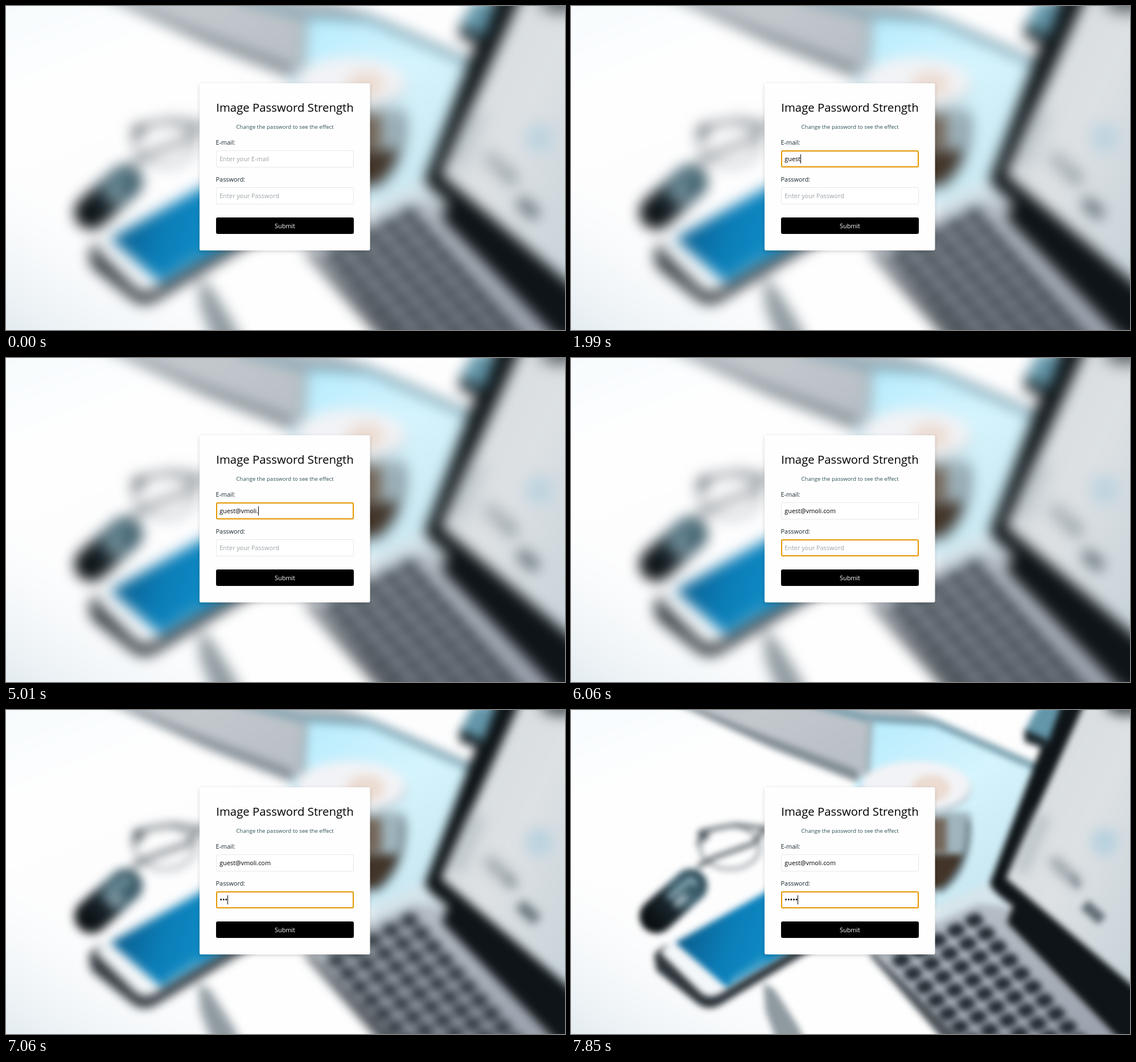
Recreate the animation shown at these times as an HTML page. Size 982 px wide and 570 px high, loop 8000 ms.

```html
<!DOCTYPE html>
<html lang="en">
<head>
<meta charset="utf-8">
<title>Image Password Strength</title>
<style>
html, body { margin: 0; width: 100%; height: 100%; overflow: hidden; background: #fff; }
svg { display: block; width: 982px; height: 570px; }
text { font: 10.85px "Open Sans", "Noto Sans", sans-serif; fill: #16282e; white-space: pre; }
.title { font-size: 20.35px; fill: #000; }
.note { font-size: 9.6px; fill: #2c4f56; }
.hint { fill: #9ca3a8; }
.typed { fill: #000; }
.dots { font-size: 12.3px; fill: #000; }
.field { fill: #fff; stroke: #e4e7eb; }
.ring { fill: none; stroke: #e59700; stroke-width: 2; }
.mid { text-anchor: middle; }
.card { filter: drop-shadow(0 2px 3px rgba(0, 0, 0, .16)); }
</style>
</head>
<body>
<svg viewBox="0 0 982 570">
  <defs>
    <filter id="blur" filterUnits="userSpaceOnUse" x="-60" y="-60" width="1102" height="690" color-interpolation-filters="sRGB">
      <feGaussianBlur id="amount" stdDeviation="12"/>
    </filter>
    <filter id="soft" x="-50%" y="-50%" width="200%" height="200%"><feGaussianBlur stdDeviation="9"/></filter>
    <linearGradient id="desk" x2=".6" y2="1">
      <stop stop-color="#f0f9fd"/><stop offset=".28" stop-color="#fefefe"/>
      <stop offset=".65" stop-color="#fdfdfe"/><stop offset="1" stop-color="#f6f9fb"/>
    </linearGradient>
    <linearGradient id="corner" x1="0" y1="1" x2=".6" y2=".3">
      <stop stop-color="#d3e0e7"/><stop offset="1" stop-color="#f3f8fa" stop-opacity="0"/>
    </linearGradient>
    <linearGradient id="folder" x1=".1" y1="0" x2=".9" y2=".5">
      <stop stop-color="#b4bbc0"/><stop offset=".5" stop-color="#c3c8cd"/><stop offset="1" stop-color="#b9c0c6"/>
    </linearGradient>
    <linearGradient id="sheet" x2=".7" y2="1">
      <stop stop-color="#b4ebfd"/><stop offset=".5" stop-color="#d5f4fd"/><stop offset="1" stop-color="#c8e6f0"/>
    </linearGradient>
    <linearGradient id="phone" x2="1" y2=".2">
      <stop stop-color="#0a527f"/><stop offset=".45" stop-color="#0b7eb8"/><stop offset="1" stop-color="#1296cf"/>
    </linearGradient>
    <linearGradient id="mouse">
      <stop stop-color="#05090b"/><stop offset=".4" stop-color="#182329"/>
      <stop offset=".65" stop-color="#456775"/><stop offset="1" stop-color="#2c4a57"/>
    </linearGradient>
    <linearGradient id="screen" x2="1" y2="1">
      <stop stop-color="#d3d9dc"/><stop offset=".45" stop-color="#dde1e4"/><stop offset="1" stop-color="#bccbd3"/>
    </linearGradient>
    <linearGradient id="deck" x2=".6" y2="1">
      <stop stop-color="#bbc4cb"/><stop offset="1" stop-color="#9da3ae"/>
    </linearGradient>
    <pattern id="keys" patternUnits="userSpaceOnUse" width="1" height="1" patternTransform="matrix(20.5 23.5 -32 17.5 714 350)">
      <rect x=".1" y=".1" width=".78" height=".78" rx=".25" fill="#252e35"/>
    </pattern>
  </defs>

  <g filter="url(#blur)">
    <rect x="-100" y="-100" width="1200" height="800" fill="url(#desk)"/>
    <rect x="-60" y="300" width="420" height="330" fill="url(#corner)"/>

    <!-- folder and blue sheet -->
    <path d="M90-60H460L640 14 530 22 520 122 500 120Z" fill="url(#folder)"/>
    <path d="M80-60 350 48 503 106 505 128 350 66Z" fill="#828d94"/>
    <path d="M528 18 640 20 816 100 735 305 640 345 500 345V125L525 110Z" fill="url(#sheet)"/>
    <path d="M400-18 520 14 640 22 816 100" fill="none" stroke="#7a9fae" stroke-width="13"/>
    <path d="M527 16 521 110" stroke="#9eafb8" stroke-width="9"/>

    <!-- cup -->
    <path d="M560 180H702Q706 250 684 290 664 322 630 324H560Z" fill="#9fb4bd"/>
    <path d="M560 190H660V250H560Z" fill="#75675a"/>
    <path d="M560 254H692Q684 292 644 314H560Z" fill="#423428"/>
    <path d="M698 195Q704 270 648 320" fill="none" stroke="#66777e" stroke-width="8"/>
    <ellipse cx="606" cy="139" rx="98" ry="49" fill="#c6d3da"/>
    <ellipse cx="606" cy="133" rx="95" ry="43" fill="#f2f3f6"/>
    <ellipse cx="632" cy="138" rx="34" ry="24" fill="#ecdcd2"/>

    <!-- glasses -->
    <g fill="none" stroke="#4d565c" stroke-width="7">
      <ellipse cx="279" cy="242" rx="52" ry="38" stroke="#9ba3a8" stroke-width="6"/>
      <path d="M222 238 234 212 290 202 345 208" stroke="#646d73"/>
      <path d="M222 276 250 260 320 235 342 208"/>
      <path d="M224 214 240 226" stroke-width="11"/>
    </g>

    <!-- mouse -->
    <g transform="translate(180 336) rotate(-42)">
      <rect x="-70" y="-30" width="140" height="60" rx="30" fill="url(#mouse)"/>
      <path d="M-4-10 48-8 50 6" fill="none" stroke="#84a5b2" stroke-width="9"/>
      <ellipse cx="10" cy="8" rx="15" ry="8" fill="#93a9b2"/>
    </g>

    <!-- phone -->
    <path d="M146 432Q150 421 180 407L350 308 440 412 264 518Q240 532 220 515L150 458Z" fill="#2d353b"/>
    <path d="M157 427 179 403 352 306 440 394 262 499Q244 509 229 498Z" fill="#f4f7f9"/>
    <path d="M183 409 350 316 440 392 273 488Z" fill="url(#phone)"/>
    <path d="M280 476 340 438" stroke="#4fa5c8" stroke-width="7"/>

    <!-- white pad -->
    <path d="M338 482 470 400 640 560V640H410L345 540Z" fill="#fefefe"/>
    <path d="M338 480 358 492 398 555 425 610H372L342 530Z" fill="#8f9aa0"/>

    <!-- laptop -->
    <path d="M535 425 715 333 760 340 1010 600H690Z" fill="url(#deck)"/>
    <path d="M640 345 732 305 775 348 715 340 640 375Z" fill="#d5e5eb"/>
    <path d="M547 437 714 350 930 597.6H707Z" fill="url(#keys)"/>
    <path d="M530 425 705 600 680 610 525 432Z" fill="#4a5157"/>
    <path d="M866-40 736 304Q736 316 776 345L766 374 970 586H1060V-40Z" fill="#0e1417"/>
    <path d="M915-40 764 296 1060 548V-40Z" fill="url(#screen)"/>
    <g filter="url(#soft)">
      <path d="M832 185 790 285" stroke="#bcc5ca" stroke-width="24"/>
      <ellipse cx="937" cy="232" rx="24" ry="25" fill="#b9d2df"/>
      <ellipse cx="975" cy="-8" rx="36" ry="18" fill="#4c5357"/>
      <path d="M845 262 892 308" stroke="#8c979d" stroke-width="17"/>
    </g>
    <path d="M902 342 933 370" stroke="#626f76" stroke-width="20"/>
    <path d="M880 290 892 312" stroke="#8f9aa0" stroke-width="12"/>

    <!-- object behind the screen -->
    <path d="M822-10H862L836 62 797 52 798 34Z" fill="#6396a9"/>
    <path d="M796 34 838 52 832 68 797 56Z" fill="#1c272c"/>
  </g>

  <rect class="card" x="340" y="136" width="299.5" height="294" rx="3" fill="#fefefe"/>
  <text class="title mid" x="490" y="186.3">Image Password Strength</text>
  <text class="note mid" x="490" y="216">Change the password to see the effect</text>
  <text x="368.6" y="244">E-mail:</text>
  <text x="368.6" y="309">Password:</text>
  <rect class="field" x="369.5" y="254.5" width="241" height="29" rx="2.5"/>
  <rect class="field" x="369.5" y="319.5" width="241" height="29" rx="2.5"/>
  <rect id="ring" class="ring" x="370" width="240" height="28" rx="2"/>
  <text id="mail" x="375.3" y="273.3"></text>
  <text id="pass" x="375.3" y="338.3"></text>
  <rect id="caret" width="1" height="16"/>
  <rect x="369" y="372" width="242" height="29" rx="3"/>
  <text class="mid" x="490" y="390.8" style="fill:#fff">Submit</text>
</svg>
<script>
const LOOP = 8000;
const MAX_BLUR = 12;
const $ = id => document.getElementById(id);

// [time, key]: 'focus', 'tab', 'back', 'blink' (caret off) or a typed character
const keys = [
  [810, 'focus'], [1270, 'g'], [1530, 'u'], [1660, 'e'], [1860, 's'], [1990, 't'], [2390, '@'],
  [2660, 'v'], [2790, 'm'], [3050, 'i'], [3520, 'blink'], [3740, 'back'], [3860, 'o'],
  [4390, 'blink'], [4590, 'l'], [4810, 'i'], [5010, '.'], [5140, 'c'], [5270, 'o'], [5400, 'm'],
  [5530, 'tab'], [6060, 'blink'], [6390, '•'], [6660, '•'], [7060, '•'], [7520, '•'], [7850, '•']
];

function stateAt(time) {
  const s = { mail: '', pass: '', focus: '', caret: false };
  for (const [t, key] of keys) {
    if (t > time) break;
    s.caret = key !== 'blink';
    if (key === 'focus') s.focus = 'mail';
    else if (key === 'tab') s.focus = 'pass';
    else if (key === 'back') s[s.focus] = s[s.focus].slice(0, -1);
    else if (key !== 'blink') s[s.focus] += key;
  }
  return s;
}

function setText(id, value, hint, filled) {
  $(id).textContent = value || hint;
  $(id).setAttribute('class', value ? filled : 'hint');
}

function draw(time) {
  const s = stateAt(time);
  const top = s.focus === 'pass' ? 319 : 254;
  setText('mail', s.mail, 'Enter your E-mail', 'typed');
  setText('pass', s.pass, 'Enter your Password', 'dots');
  $('amount').setAttribute('stdDeviation', MAX_BLUR * (1 - s.pass.length / 10));
  $('ring').style.display = s.focus ? '' : 'none';
  $('ring').setAttribute('y', top + 1);
  $('caret').style.display = s.caret ? '' : 'none';
  if (!s.caret) return;
  const width = s[s.focus] ? $(s.focus).getComputedTextLength() : 0;
  $('caret').setAttribute('x', Math.round(375.3 + width));
  $('caret').setAttribute('y', top + 7);
}

let last = -1;
const start = performance.now();
function tick() {
  const time = (performance.now() - start) % LOOP;
  const step = keys.filter(k => k[0] <= time).length;
  if (step !== last) draw(time);
  last = step;
  requestAnimationFrame(tick);
}
tick();
</script>
</body>
</html>
```
